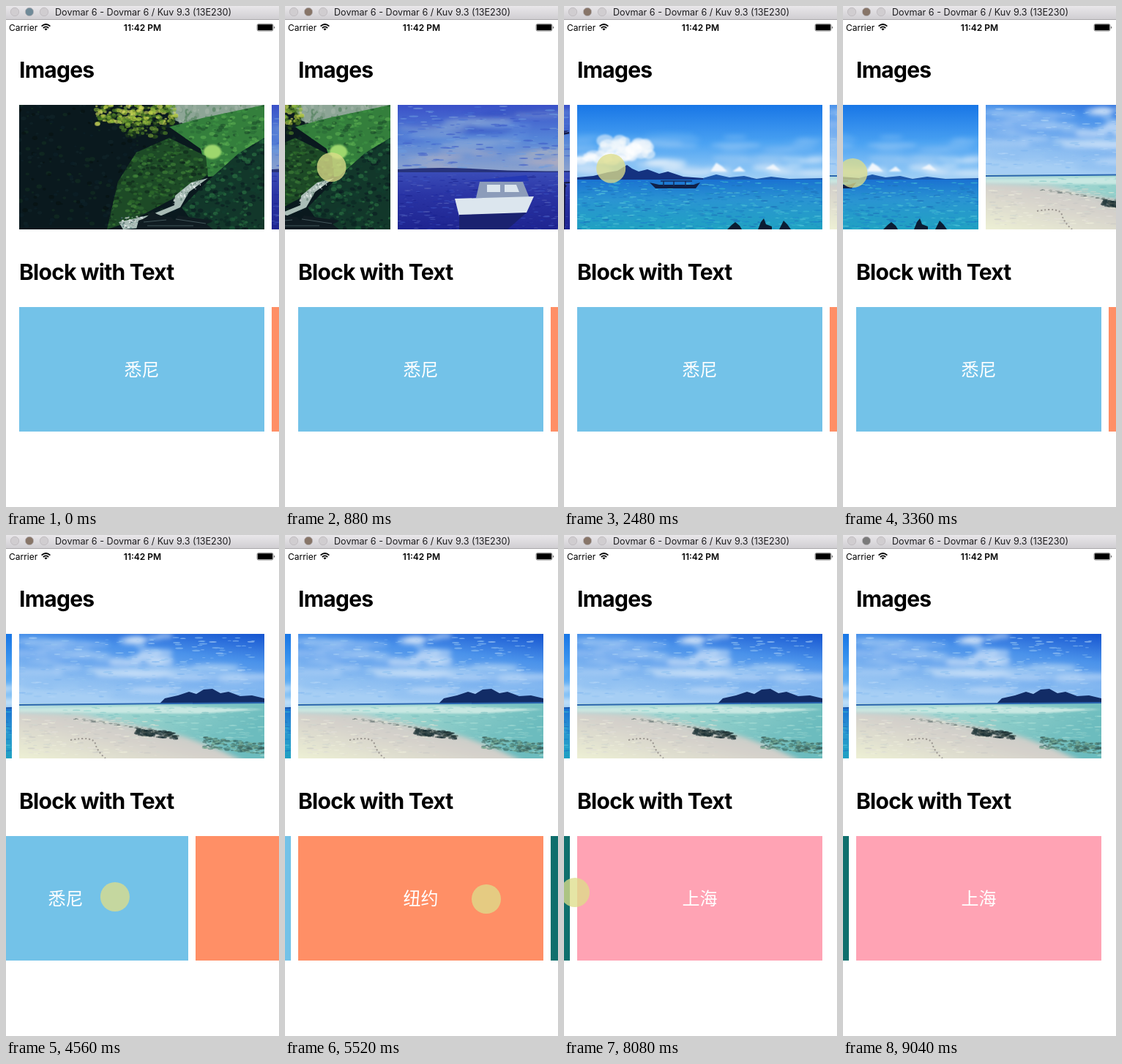
Animation of 373x684 px, one loop 9.12 s. Source, as an HTML page:

```html
<!DOCTYPE html>
<html lang="en">
<head>
<meta charset="utf-8">
<title>Carousels</title>
<style>
  html, body { margin: 0; width: 100%; height: 100%; overflow: hidden; background: #fff; }
  #stage { display: block; width: 373px; height: 684px; font-family: Inter, Roboto, sans-serif; }
  .heading { font-size: 30px; font-weight: 700; letter-spacing: -.75px; }
  .city { font: 500 24px "Noto Sans CJK SC", "Noto Sans CJK", sans-serif; fill: #fff; text-anchor: middle; }
</style>
</head>
<body>
<svg id="stage" viewBox="0 0 373 684">
  <defs>
    <linearGradient id="bar" x2="0" y2="1"><stop stop-color="#e9e7ea"/><stop offset="1" stop-color="#d0ced2"/></linearGradient>
    <linearGradient id="duskSky" x2="0" y2="1"><stop stop-color="#3a50c8"/><stop offset=".5" stop-color="#5585d8"/><stop offset="1" stop-color="#8fa4cc"/></linearGradient>
    <linearGradient id="duskSea" x2="0" y2="1"><stop stop-color="#3a4cb8"/><stop offset=".4" stop-color="#2a34a4"/><stop offset="1" stop-color="#1e2490"/></linearGradient>
    <linearGradient id="baySky" x2="0" y2="1"><stop stop-color="#1876e6"/><stop offset=".5" stop-color="#4aa2f2"/><stop offset="1" stop-color="#a4d2f6"/></linearGradient>
    <linearGradient id="baySea" x2="0" y2="1"><stop stop-color="#1a72d2"/><stop offset=".4" stop-color="#2a94d2"/><stop offset="1" stop-color="#20a2c2"/></linearGradient>
    <linearGradient id="beachSky" x1="1" x2=".6" y2="1"><stop stop-color="#1554d0"/><stop offset=".35" stop-color="#4a92ea"/><stop offset="1" stop-color="#a6cef4"/></linearGradient>
    <linearGradient id="lagoon" x2="1" y2=".3"><stop stop-color="#b8dce0"/><stop offset=".5" stop-color="#98d2cc"/><stop offset="1" stop-color="#6cbcbe"/></linearGradient>
    <linearGradient id="sand" x1="1" x2="0" y2="1"><stop stop-color="#b4c8c2"/><stop offset=".5" stop-color="#d4d0cb"/><stop offset="1" stop-color="#f2f6d6"/></linearGradient>
    <filter id="soft" x="-20%" y="-40%" width="140%" height="180%"><feGaussianBlur stdDeviation="3"/></filter>
    <filter id="haze" x="-20%" y="-40%" width="140%" height="180%"><feGaussianBlur stdDeviation="1.2"/></filter>
    <clipPath id="bush"><path d="M120 170L135 105 160 65 205 45 255 70 258 95 225 120 150 160Z"/></clipPath>
    <clipPath id="slope"><path d="M205 30L250 18 335 0V58L300 70 285 96 258 98 248 60Z"/></clipPath>
    <clipPath id="cliff"><path d="M335 45V170H245L222 140 262 100 300 66Z"/></clipPath>
  </defs>

  <g id="images">
    <svg x="18" y="135" width="335" height="170">
      <rect width="335" height="170" fill="#0a191e"/>
      <g class="dots" data-n="350" data-box="0 0 215 165" data-size="4 3" data-colors="#10252a #06100f #122e22 #0c1f28"/>
      <path d="M200 0H335V28L250 34 215 22Z" fill="#8da596"/>
      <g class="dots" data-n="90" data-box="212 0 325 24" data-size="3 4" data-colors="#a6b8aa #77947e #91a898 #4f7f58"/>
      <g class="dots" data-n="260" data-box="105 0 215 26" data-size="4 3" data-colors="#b6cc42 #d8df62 #568b2a #31571c #86b038"/>
      <g class="dots" data-n="70" data-box="140 22 200 44" data-size="4 3" data-colors="#568b2a #31571c #1c3a1c #86b038"/>
      <g clip-path="url(#slope)">
        <rect width="335" height="170" fill="#347f3c"/>
        <g class="dots" data-n="320" data-box="205 0 335 98" data-size="4 2.5" data-colors="#3f9343 #5bae50 #296a36 #1c4d2b"/>
      </g>
      <ellipse cx="264" cy="64" rx="12" ry="10" fill="#9ed76d" filter="url(#haze)"/>
      <g clip-path="url(#bush)">
        <rect width="335" height="170" fill="#1d4a26"/>
        <g class="dots" data-n="480" data-box="118 45 258 165" data-size="4 2.5" data-colors="#2f6e2c #44883a #16381f #0c2419 #316b35"/>
      </g>
      <g clip-path="url(#cliff)">
        <rect width="335" height="170" fill="#12372a"/>
        <g class="dots" data-n="380" data-box="222 45 335 170" data-size="4 3" data-colors="#1d5a38 #2d7845 #0b2622 #123d2d #0a1b20"/>
      </g>
      <path d="M258 100L235 106 213 124 212 137 180 150 136 160 142 170 165 168 190 153 220 140 232 119Z" fill="#a9bcb6"/>
      <g class="dots" data-n="60" data-box="138 152 172 168" data-size="2 1.5" data-colors="#fff #e3ecec #58807e #203a38"/>
      <g class="dots" data-n="40" data-box="210 126 248 138" data-slope="-.7" data-size="1.5 2" data-colors="#fff #dfe9e6 #5a7a6c"/>
      <path d="M163 158Q176 154 182 145 192 153 207 153L212 158 217 151 265 158 256 163 265 170H160Z" fill="#101c22"/>
      <path d="M170 160L201 157M175 165H238M214 156L255 162" stroke="#42565a" fill="none"/>
    </svg>

    <svg x="363" y="135" width="335" height="170">
      <rect width="335" height="92" fill="url(#duskSky)"/>
      <g filter="url(#soft)">
        <g class="dots" data-n="30" data-box="0 8 335 60" data-size="50 5" data-colors="#3450c4 #6f9ce0 #4468d0 #8aa8d6"/>
        <g class="dots" data-n="16" data-box="0 62 260 84" data-size="45 5" data-colors="#b9b0bc #a3b0cc #c4bcb4"/>
      </g>
      <g class="dots" data-n="300" data-box="0 2 335 86" data-size="7 1.2" data-colors="#4a72d4 #6b9be0 #3c5ac8 #7a9cd8"/>
      <path d="M0 88Q60 84 120 88T335 90V94H0Z" fill="#27337c"/>
      <rect y="92" width="335" height="78" fill="url(#duskSea)"/>
      <g class="dots" data-n="500" data-box="0 95 335 170" data-size="5 .9" data-colors="#3d56c4 #17208a #4a5abc #222da4 #5c68bc"/>
      <path d="M95 104L176 96 179 104Z" fill="#2438b4"/>
      <path d="M112 105H171L180 127H107Z" fill="#8c9cba"/>
      <path d="M122 109H140V119H122ZM146 109H162L166 119H146Z" fill="#dce6ee"/>
      <path d="M78 128L186 125 176 147 140 152H84Z" fill="#dce6ee"/>
      <path d="M84 150L176 147 150 170H84Z" fill="#1a2270"/>
      <g stroke="#141843" fill="none">
        <path d="M304 44L300 170M304 44L275 25M304 44L334 38M304 44L311 78" stroke-width="2.5"/>
        <path d="M293 108L335 106M298 112L294 170M328 108L327 170M294 155L330 110" stroke-width="2"/>
      </g>
      <path d="M276 24L308 36 334 35 312 46 302 49Z" fill="#232a68"/>
    </svg>

    <svg x="708" y="135" width="335" height="170">
      <rect width="335" height="104" fill="url(#baySky)"/>
      <g filter="url(#soft)">
        <g class="dots" data-n="26" data-box="0 40 335 62" data-size="40 5" data-colors="#6cb2f4 #8cc4f6 #58a8f2"/>
        <g class="dots" data-n="36" data-box="0 72 335 94" data-size="30 6" data-colors="#c8e2f8 #e4f0fa #98c8f4"/>
      </g>
      <g filter="url(#haze)">
        <g class="dots" data-n="40" data-box="28 48 104 72" data-size="12 9" data-colors="#fff #f4f8fc #e2eefa"/>
        <g class="dots" data-n="16" data-box="0 66 60 80" data-size="12 5" data-colors="#fff #dcebfa"/>
        <path d="M182 91L190 79 198 84 205 91ZM212 91L222 84 230 91ZM257 87L268 81 278 90Z" fill="#f0f6fc"/>
      </g>
      <path d="M0 99L22 97 42 92 55 90 68 82 75 87 84 91 96 88 112 94 124 91 145 98 172 100V104H0Z" fill="#143280"/>
      <path d="M172 100L190 95 208 99 228 97 245 101 265 98 290 101 335 100V104H172Z" fill="#1c58ac"/>
      <rect y="102" width="335" height="68" fill="url(#baySea)"/>
      <g class="dots" data-n="650" data-box="0 104 335 170" data-size="5 1" data-colors="#1c80cc #3cbad2 #1c8ac8 #58c6da #1a6cb8"/>
      <path d="M99 106L112 109H159L168 106 162 114H107Z" fill="#102048"/>
      <path d="M114 104H157M118 104V111M132 104V111M148 104V111" stroke="#142c60" stroke-width="1.5"/>
      <path d="M205 170L211 164 216 160 222 165 225 170ZM247 170L251 160 255 155 258 163 266 166V170ZM276 170L282 158 287 163 292 170Z" fill="#0b1d34"/>
    </svg>

    <svg x="1053" y="135" width="335" height="170">
      <rect width="335" height="98" fill="url(#beachSky)"/>
      <g filter="url(#soft)">
        <g class="dots" data-n="34" data-box="0 45 320 88" data-size="48 6" data-colors="#bcdaf6 #c8e0f8 #90c0f2"/>
        <g class="dots" data-n="22" data-box="0 8 130 44" data-size="38 5" data-colors="#8abaf2 #6aa6ee #a4caf4"/>
        <g class="dots" data-n="18" data-box="132 2 205 40" data-size="18 6" data-colors="#d2e4f8 #c0daf6"/>
      </g>
      <g class="dots" data-n="260" data-box="0 5 320 86" data-size="6 1.2" data-colors="#7cb4f0 #8dbff2 #94c4f2 #b1d3f6"/>
      <path d="M193 94L199 88 217 84 232 79 242 82 252 76 264 75 275 81 286 79 302 85 318 84 335 88V96H193Z" fill="#122c66"/>
      <rect y="95" width="335" height="75" fill="url(#lagoon)"/>
      <path d="M0 96L335 93V95L0 98Z" fill="#2a66b0"/>
      <path d="M0 102L190 98 335 103 250 109 0 107Z" fill="#c8e8e2" filter="url(#haze)"/>
      <g class="dots" data-n="320" data-box="60 99 335 168" data-size="6 1" data-colors="#84c8c6 #91d5ce #a9ded6 #74bcbc"/>
      <path d="M-9 107L85 110 128 119 174 128 225 140 267 155 320 180H-9Z" fill="url(#sand)" filter="url(#soft)"/>
      <g class="dots" data-n="220" data-box="5 115 190 166" data-size="5 1" data-colors="#e3dfd9 #c8c8c4 #efefdc #d1d7cf"/>
      <g class="dots" data-n="60" data-box="74 114 185 117" data-slope=".14" data-size="3 .8" data-colors="#5d6d6b #8a9690"/>
      <path d="M70 145Q101 139 104 150T118 170" stroke="#9b9690" stroke-width="2" stroke-dasharray="2 3" fill="none"/>
      <g class="dots" data-n="150" data-box="160 129 216 138" data-slope=".1" data-size="4 1.6" data-colors="#162b31 #273c40 #43504b"/>
      <g class="dots" data-n="200" data-box="253 141 335 156" data-slope=".1" data-size="4 1.5" data-colors="#396a69 #568c7f #3c605c #76a68f"/>
    </svg>
  </g>

  <g id="blocks"></g>

  <rect width="373" height="18" fill="url(#bar)"/>
  <rect y="18" width="373" height="1" fill="#aaa8ac"/>
  <g fill="#d0cdd0" stroke="#bbb8bc" stroke-width=".8">
    <circle cx="12" cy="8" r="5.7"/><circle id="light" cx="32" cy="8" r="5.7"/><circle cx="52" cy="8" r="5.7"/>
  </g>
  <text x="67" y="13" font-size="12.6" fill="#1c1c1e">Dovmar 6 - Dovmar 6 / Kuv 9.3 (13E230)</text>
  <text x="4" y="34" font-size="12">Carrier</text>
  <g fill="none" stroke="#000" stroke-width="1.7">
    <path d="M48.6 27.6Q54.5 22.4 60.4 27.6M50.8 30Q54.5 26.8 58.2 30"/>
    <path d="M52.4 31.2Q54.5 29.6 56.6 31.2L54.5 33.6Z" fill="#000" stroke="none"/>
  </g>
  <text x="186.5" y="34" font-size="12" font-weight="600" text-anchor="middle">11:42 PM</text>
  <rect x="343" y="24.5" width="22" height="9.6" rx="2" fill="none" stroke="#777" stroke-width=".8"/>
  <rect x="343.8" y="25.3" width="20.4" height="8" rx="1"/>
  <path d="M366.4 27.6Q368.2 29.4 366.4 31.2Z"/>
  <text class="heading" x="18" y="98">Images</text>
  <text class="heading" x="18" y="374">Block with Text</text>
  <circle id="touch" r="20" fill="#dedd8a" fill-opacity=".77"/>
</svg>
<script>
const LOOP = 9120, STEP = 80, PITCH = 345;
const $ = id => document.getElementById(id);

function add(parent, tag, attrs, text = "") {
  const el = document.createElementNS("http://www.w3.org/2000/svg", tag);
  for (const key in attrs) el.setAttribute(key, attrs[key]);
  el.textContent = text;
  parent.append(el);
}

let seed = 7;
const random = () => (seed = (seed * 16807) % 2147483647) / 2147483647;

// Scatter small ellipses for foliage, clouds and water.
for (const group of document.querySelectorAll(".dots")) {
  const { n, box, size, colors, slope = 0 } = group.dataset;
  const [x0, y0, x1, y1] = box.split(" ").map(Number);
  const [rx, ry] = size.split(" ").map(Number);
  const palette = colors.split(" ");
  for (let i = 0; i < n; i++) {
    const dx = random() * (x1 - x0), scale = .35 + random() * .65;
    add(group, "ellipse", {
      cx: (x0 + dx).toFixed(1),
      cy: (y0 + random() * (y1 - y0) + slope * dx).toFixed(1),
      rx: (rx * scale).toFixed(1), ry: (ry * scale).toFixed(1),
      fill: palette[Math.floor(random() * palette.length)],
      opacity: .6
    });
  }
}

[["悉尼", "#73c2e8"], ["纽约", "#ff8f66"], ["东京", "#0f6f6d"], ["上海", "#ffa3b4"]].forEach(([city, fill], i) => {
  const x = 18 + i * PITCH;
  add($("blocks"), "rect", { x, y: 411, width: 335, height: 170, fill });
  add($("blocks"), "text", { class: "city", x: x + 167.5, y: 505 }, city);
});

// The touch glides to x0 from time `glide` to `ready`, then drags to x1 from `start` to `end`.
const swipes = [
  { strip: "images", glide: 80, ready: 400, start: 560, end: 1120, x0: 285, x1: 42, y: 220 },
  { strip: "images", glide: 1440, ready: 1600, start: 1600, end: 2100, x0: 262, x1: 45, y: 221 },
  { strip: "images", glide: 2400, ready: 2800, start: 3050, end: 3680, x0: 230, x1: -45, y: 228 },
  { strip: "blocks", glide: 3840, ready: 4160, start: 4330, end: 4960, x0: 258, x1: 53, y: 494 },
  { strip: "blocks", glide: 5120, ready: 5520, start: 5760, end: 6560, x0: 275, x1: 61, y: 497 },
  { strip: "blocks", glide: 6560, ready: 7040, start: 7280, end: 8080, x0: 290, x1: 15, y: 488 }
];
const enter = { x: 393, y: 220 }, leave = { x: 80, y: -20, glide: 8240, ready: 9040 };
const DRAG = .7; // share of a swipe spent touching; the rest is settling

function ease(t, from, to) {
  const p = Math.min(1, Math.max(0, (t - from) / (to - from)));
  return p * p * (3 - 2 * p);
}

function scroll(strip, t) {
  const pages = swipes.filter(s => s.strip === strip).reduce((sum, s) => sum + ease(t, s.start, s.end), 0);
  $(strip).setAttribute("transform", `translate(${-Math.round(pages * PITCH)})`);
}

function touchAt(t) {
  let { x, y } = enter;
  const glideTo = (toX, toY, { glide, ready }) => {
    const k = ease(t, glide, ready);
    x += (toX - x) * k;
    y += (toY - y) * k;
  };
  for (const s of swipes) {
    glideTo(s.x0, s.y, s);
    x += (s.x1 - s.x0) * ease(t, s.start, s.start + (s.end - s.start) * DRAG);
  }
  glideTo(leave.x, leave.y, leave);
  return [x, y];
}

const begin = performance.now();
function draw() {
  const elapsed = Math.max(0, performance.now() - begin);
  const t = Math.floor((elapsed % LOOP) / STEP) * STEP;
  scroll("images", t);
  scroll("blocks", t);
  $("touch").setAttribute("transform", `translate(${touchAt(t).map(v => v.toFixed(1)).join(" ")})`);
  $("light").setAttribute("fill", t < 160 ? "#708a98" : t < 8640 ? "#877568" : "#7a7a7a");
  requestAnimationFrame(draw);
}
draw();
</script>
</body>
</html>
```
